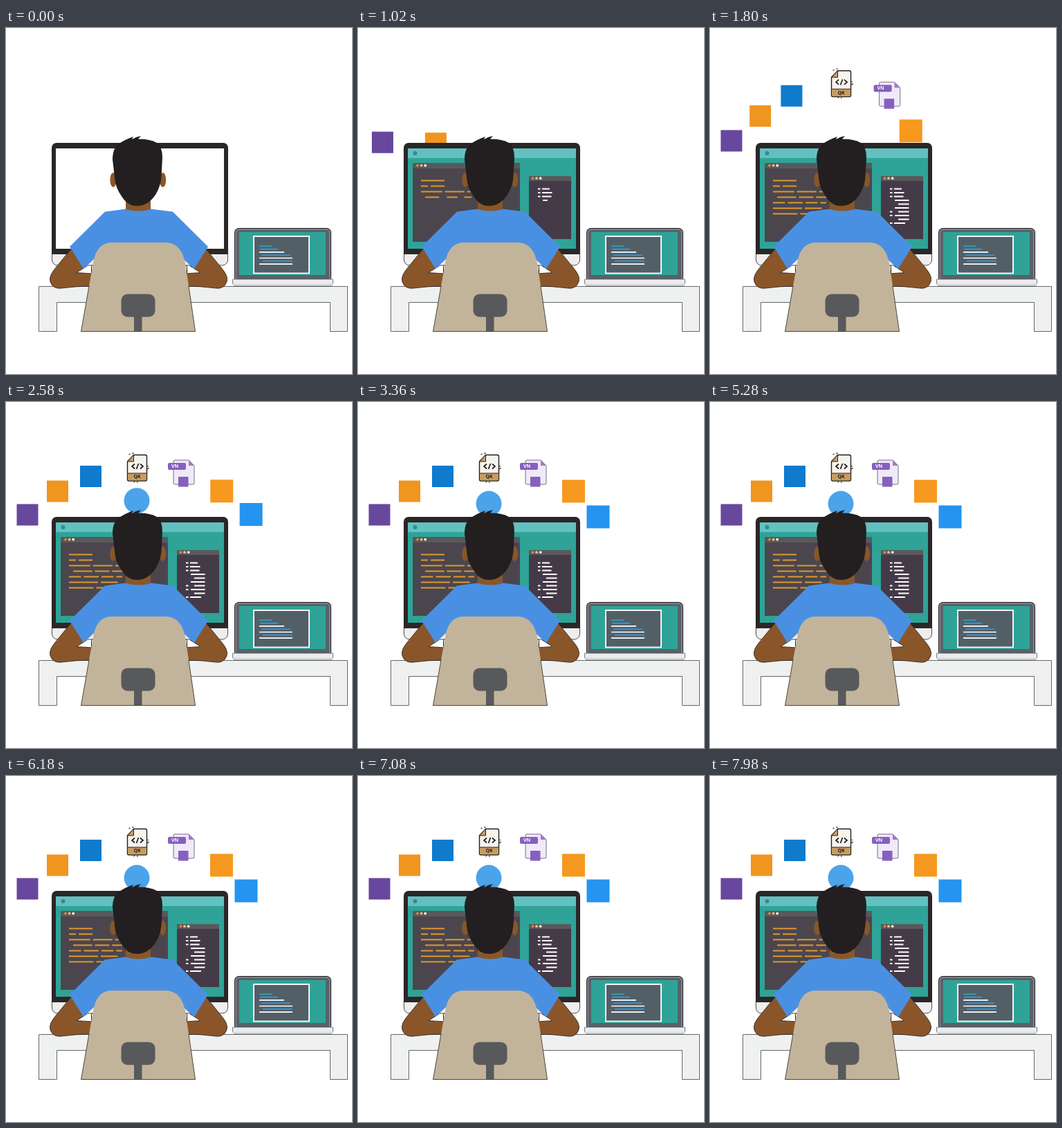
Recreate the animation shown at these times as an HTML page with a canvas. Size 500x500 px, loop 8 s.

```html
<!DOCTYPE html>
<html lang="en">
<head>
<meta charset="utf-8">
<title>Developer at a desk</title>
<style>
  html, body { margin: 0; width: 100%; height: 100%; overflow: hidden; background: #fff; }
  canvas { display: block; width: 100vw; height: 100vh; }
</style>
</head>
<body>
<canvas id="stage"></canvas>
<script>
const LOOP = 8000, SIZE = 500, STEP = 60;
const canvas = document.getElementById('stage');
const ctx = canvas.getContext('2d');
const dpr = window.devicePixelRatio || 1;
canvas.width = canvas.height = SIZE * dpr;

const INK = '#231f20', SKIN = '#8a5629', TEAL = '#2fa397', GREY = '#58595b';
const ORANGE = '#e0982c', WHITE = '#fff', BLUE = '#2d9fe6', PURPLE = '#8660bf';
const HOME = { x: 189, y: 243 }; // icons fly out from here, behind the monitor
const FIRST = 640, STAGGER = 176, FLIGHT = 1100;

const clamp = v => Math.max(0, Math.min(1, v));
const progress = (t, start, length) => clamp((t - start) / length);
const backOut = u => 1 + 2.70158 * (u - 1) ** 3 + 1.70158 * (u - 1) ** 2;

function seeded(seed) {
  return () => (seed = seed * 16807 % 2147483647) / 2147483647;
}

function box(x, y, w, h, fill, radius = 0, line, width = 1) {
  ctx.beginPath();
  ctx.roundRect(x, y, w, h, radius);
  if (fill) { ctx.fillStyle = fill; ctx.fill(); }
  if (line) { ctx.strokeStyle = line; ctx.lineWidth = width; ctx.stroke(); }
}

function shape(d, fill, line, width = 1) {
  const path = new Path2D(d);
  if (fill) { ctx.fillStyle = fill; ctx.fill(path); }
  if (line) { ctx.strokeStyle = line; ctx.lineWidth = width; ctx.stroke(path); }
}

function oval(x, y, rx, ry, fill) {
  ctx.beginPath();
  ctx.ellipse(x, y, rx, ry, 0, 0, Math.PI * 2);
  ctx.fillStyle = fill;
  ctx.fill();
}

function label(text, x, y, size, fill) {
  ctx.font = `bold ${size}px "Open Sans", sans-serif`;
  ctx.textAlign = 'center';
  ctx.textBaseline = 'middle';
  ctx.fillStyle = fill;
  ctx.fillText(text, x, y);
}

const square = (side, color) => () => box(-side / 2, -side / 2, side, side, color);

function codeFile() {
  shape('M-5 -18.5 H12 Q14 -18.5 14 -16 V17 Q14 19 12 19 H-12 Q-14 19 -14 17 V-9 Z', '#f7f3ec', INK, 1.4);
  shape('M-5 -18.5 V-9 H-14 Z', '#cba063', INK);
  box(-13.3, 8, 26.6, 10.3, '#c69c5e', [0, 0, 2, 2]);
  shape('M-14 8 H14', null, INK);
  shape('M-3.5 -5.5 L-7.5 -2 L-3.5 1.5 M4.5 -5.5 L8.5 -2 L4.5 1.5 M2 -6 L-1 2', null, INK, 1.7);
  label('QK', 0, 13.6, 7, INK);
  // short sparks at the top left, right and bottom
  shape('M-12 -19 l2 -1 m3 -1 l2 0 M15 -3 l1 1 m1 2 l-2 2 M-5 20.5 h1.5 m3 .5 h1.5', null, INK, 1.3);
}

function designFile() {
  shape('M-9 -17 H11 L19 -9 V16 Q19 18 17 18 H-9 Q-11 18 -11 16 V-15 Q-11 -17 -9 -17 Z', '#f0e9f8', '#5b4a6c', .8);
  shape('M11 -17 V-9 H19 Z', '#9d78d2');
  box(-19, -13, 26, 10, PURPLE, 2);
  label('VN', -9, -7.6, 7, WHITE);
  box(-4, 7, 14.5, 14.5, PURPLE);
}

const icons = [
  { x: 31, y: 163, draw: square(31, '#68489f') },
  { x: 74.5, y: 129, draw: square(31, '#f0951f') },
  { x: 122.5, y: 107.5, draw: square(31, '#0f7bcd') },
  { x: 189.5, y: 95, draw: codeFile },
  { x: 253, y: 101, draw: designFile },
  { x: 311.5, y: 129, draw: square(33, '#f7981f') },
  { x: 347, y: 166, draw: square(33, '#2494f0') },
  { x: 189, y: 147, draw: () => oval(0, 0, 18.5, 18.5, '#4ba3ea') },
];

function drawIcons(t) {
  icons.forEach(({ x, y, draw }, i) => {
    // the last two leave together
    const start = FIRST + STAGGER * Math.min(i, icons.length - 2);
    if (t < start) return;
    const p = backOut(progress(t, start, FLIGHT));
    ctx.save();
    ctx.translate(HOME.x + (x - HOME.x) * p, HOME.y + (y - HOME.y) * p);
    draw();
    ctx.restore();
  });
}

// Rows appear one after another; drawRow gets the row and its shown part.
function typeRows(count, shown, drawRow) {
  for (let i = 0; i < count; i++) drawRow(i, clamp(shown * count - i));
}

function mainCode(shown) {
  const rand = seeded(71);
  typeRows(7, shown, (i, part) => {
    const y = 219.5 + i * 8, end = i < 2 ? 125 : 168;
    let x = i === 3 ? 97 : 91;
    while (x < end - 6) {
      const w = Math.min(i ? 10 + rand() * 32 : 34, end - x);
      box(x, y, w * part, 2, ORANGE);
      x += w + 4;
    }
  });
}

function sideCode(shown) {
  const rand = seeded(19);
  typeRows(10, shown, (i, part) => {
    const y = 231.5 + i * 5.5, nested = i > 2 && i < 9;
    const x = nested ? 267 + (i % 2 ? 0 : 5) : 266;
    const end = nested ? 287.5 : 277 + rand() * 7;
    if (!nested || i === 6 || i === 7) box(260, y, 3.5 * part, 2, WHITE);
    box(x, y, (end - x) * part, 2, WHITE);
  });
}

function laptopCode() {
  typeRows(7, 1, i => {
    const x = 366 + (i % 2 ? i : 0), end = Math.min(384 + i * 9, 414);
    box(x, 314.5 + i * 4.3, end - x, 1.6, i ? (i % 2 ? BLUE : WHITE) : '#3aa7b0');
  });
}

function appWindow(x, y, w, h, head, body, p, content) {
  if (p <= 0) return;
  const s = backOut(p), cx = x + w / 2, cy = y + h / 2;
  ctx.save();
  ctx.translate(cx, cy);
  ctx.scale(s, s);
  ctx.translate(-cx, -cy);
  box(x, y, w, h, body);
  box(x, y, w, head, GREY);
  ['#d98a35', '#e8c07a', '#f3eee4'].forEach((c, i) => oval(x + head * 1.5 - 5 + i * 5.6, y + head / 2 - .3, 1.9, 1.9, c));
  content();
  ctx.restore();
}

function monitor(t) {
  box(123.5, 343.5, 138, 14, '#fafafa', 1, INK);
  box(66.5, 320, 254, 23, '#f0eeed', [0, 0, 8, 8], INK, .8);
  box(66, 166, 255, 161, '#2b2628', [7, 7, 0, 0]);
  box(72, 174, 243, 145, WHITE);

  ctx.save();
  ctx.beginPath();
  ctx.rect(72, 174, 243, 145);
  ctx.clip();
  ctx.globalAlpha = progress(t, 120, 300);
  box(72, 174, 243, 145, TEAL);
  box(72, 174, 243, 14, '#62c0c0');
  oval(82.5, 181, 3, 3, '#3f858c');
  ctx.globalAlpha = 1;
  appWindow(79, 195, 155, 114, 8, '#4b464e', progress(t, 300, 360), () => mainCode(progress(t, 540, 900)));
  appWindow(247, 214, 61, 91, 7, '#453a48', progress(t, 480, 360), () => sideCode(progress(t, 720, 900)));
  ctx.restore();
}

function laptop() {
  box(330.5, 289.5, 139, 78, '#59616a', 6, INK);
  box(332, 291, 136, 76, null, 5, '#aeb4b8', .8);
  box(337, 295, 125, 62, TEAL);
  box(358, 301, 80, 53.5, '#535f67', 0, '#f4f6f6', 2);
  laptopCode();
  box(327.5, 363, 145, 10, '#ececee', [1, 1, 5, 5], '#55565a', .8);
  box(328, 369.5, 144, 2.5, '#dcdde0', [0, 0, 4, 4]);
}

function desk() {
  shape('M47.5 373.5 H493.5 V438.5 H468.5 V396.5 H73.5 V438.5 H47.5 Z', '#eff1f1', '#404244', .8);
}

function mirrored(axis, draw) {
  draw();
  ctx.save();
  ctx.translate(axis * 2, 0);
  ctx.scale(-1, 1);
  draw();
  ctx.restore();
}

function person() {
  mirrored(191.5, () => shape(
    'M95 318 L69 350 Q59 363 67 372 Q71 377 80 376 Q102 373 126 373 V355 L102 353.5 L117 344 Z', SKIN, INK, .8));
  shape('M143 265.5 L173 261.5 H209 L241 265.5 L292 316 L272 348 L256 334 V350 H127 V334 L112 348 L92 316 Z', '#4a90e2');
  shape('M173 238 H209 V262 Q191 267 173 262 Z', SKIN);
  mirrored(190.8, () => oval(155, 219.5, 4.6, 10.5, SKIN));
  shape('M154 190 Q154 172 165 166 L172 162 Q178 159 184 157 L182 161 Q188 157 195 156 L191 160.5 ' +
    'Q208 160 218 166 Q226 172 226 187 L224.5 216 Q223 230 216 241 Q205 257 190 257 ' +
    'Q176 258 167 243 Q158 231 157 216 Z', INK);
}

function chair() {
  shape('M108.5 438.5 L125.5 342 Q130 310 153 310 H230 Q254 310 259.5 342 L273.5 438.5 Z', '#c2b49a');
  shape('M120 373 L108.5 438.5 H273.5 L264 373', null, '#3a352e', .9);
  box(185, 412, 11.5, 26, GREY);
  box(166.5, 384.5, 49, 33, GREY, 9);
}

function render(t) {
  ctx.setTransform(dpr, 0, 0, dpr, 0, 0);
  ctx.fillStyle = WHITE;
  ctx.fillRect(0, 0, SIZE, SIZE);
  drawIcons(t);
  monitor(t);
  desk();
  laptop();
  person();
  chair();
}

const begin = performance.now();
function tick() {
  const t = Math.max(0, performance.now() - begin) % LOOP;
  render(Math.floor(t / STEP) * STEP);
  requestAnimationFrame(tick);
}
tick();
</script>
</body>
</html>
```
